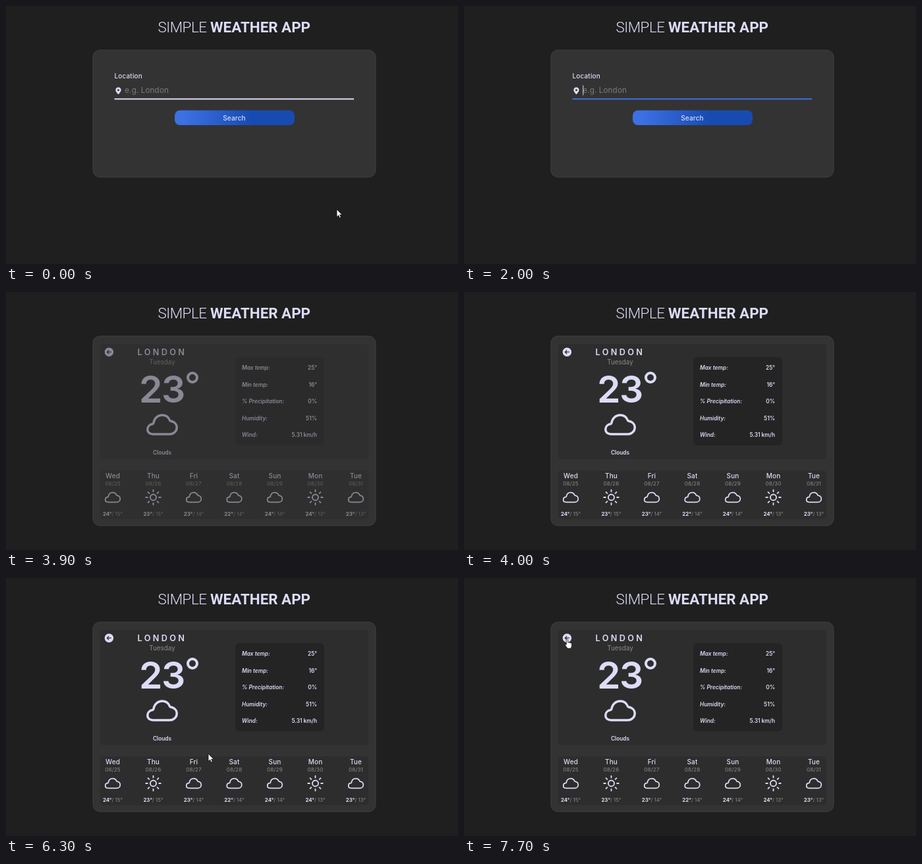
An HTML page that plays this animation: 686 px wide and 392 px high, repeating every 8 s.

```html
<!DOCTYPE html>
<html lang="en">
<head>
<meta charset="utf-8">
<title>Simple Weather App</title>
<style>
html, body { margin: 0; width: 100%; height: 100%; overflow: hidden; background: #1f1f1f; }
svg { display: block; width: 100%; height: 100%; }
text { font-family: Inter, "Open Sans", sans-serif; fill: #dcdcf8; white-space: pre; }
.title { font-family: Roboto, sans-serif; font-size: 22.4px; }
.label { font-size: 10px; font-weight: 500; letter-spacing: .15px; }
.small { font-size: 8.3px; font-weight: 600; }
.date { font-size: 8.2px; letter-spacing: .1px; }
.temp { font-size: 7.9px; }
.mid { text-anchor: middle; }
.end { text-anchor: end; }
.grey { fill: #8b8b8b; }
.icon { fill: none; stroke: #dcdcf8; stroke-linecap: round; stroke-linejoin: round; }
</style>
</head>
<body>
<svg viewBox="0 0 686 392">
  <defs>
    <linearGradient id="blue">
      <stop offset=".08" stop-color="#3c70e3"/>
      <stop offset=".64" stop-color="#184bb2"/>
    </linearGradient>
    <linearGradient id="bright">
      <stop offset=".3" stop-color="#3c70e3"/>
      <stop offset="1" stop-color="#245ac6"/>
    </linearGradient>
    <path id="cloud" stroke-width="37" d="M100 241a16 16 0 0 0 13.5-13C126.600 145.600 186.300 96 256 96c64.700 0 107.800 42.400 125 87a16 16 0 0 0 12.500 10C449.400 202 496 239 496 300c0 62-51 108-112 108H106c-49.500 0-90-24.700-90-79.200 0-48.500 38.700-80.600 84-87.800z"/>
    <g id="sun" stroke-width="34">
      <circle cx="256" cy="256" r="84"/>
      <path d="M256 48v48M256 416v48M403 109l-34 34M143 369l-34 34M464 256h-48M96 256H48M403 403l-34-34M143 143l-34-34"/>
    </g>
  </defs>

  <text class="title" x="230.500" y="40" font-weight="300" letter-spacing="-.5">SIMPLE</text>
  <text class="title" x="310" y="40" font-weight="700">WEATHER APP</text>
  <rect id="card" x="132" y="67" width="429" height="193" rx="10.500" fill="#333" stroke="#404040"/>

  <g id="form">
    <text class="label" x="164.500" y="109.500">Location</text>
    <path fill="#dcdcf8" fill-rule="evenodd" d="M170.500 123.500c-2.500 0-4.200 1.800-4.200 4.100 0 2.800 4.200 7 4.200 7s4.200-4.200 4.200-7c0-2.300-1.700-4.100-4.200-4.100zm0 2.700a1.500 1.500 0 1 1 0 3 1.500 1.500 0 0 1 0-3z"/>
    <text id="hint" class="grey" x="180.300" y="132.300" font-size="11.700" letter-spacing=".1" style="fill:#7b7b7b">e.g. London</text>
    <text id="typed" x="180.500" y="132.300" font-size="11.700" font-weight="500" letter-spacing=".3"></text>
    <rect id="caret" y="120.500" width="1" height="15" fill="#dcdcf8"/>
    <rect id="line" x="164.500" y="140.300" width="363.500" height="2"/>
    <rect id="button" x="256" y="158.500" width="182" height="22.500" rx="8"/>
    <text class="label mid" x="346.500" y="173.500">Search</text>
  </g>

  <g id="result">
    <rect x="143" y="79" width="407" height="175" rx="5" fill="#2d2d2d"/>
    <circle cx="156.400" cy="91.200" r="6.700" fill="#dcdcf8"/>
    <path d="M159.800 91.200h-6.300m2.700-2.800l-2.800 2.800 2.800 2.800" fill="none" stroke="#2d2d2d" stroke-width="1.300"/>
    <text x="199.500" y="96" font-size="12.700" font-weight="600" letter-spacing="3.350">LONDON</text>
    <text class="mid grey" x="237" y="109.500" font-size="9.900">Tuesday</text>
    <text x="202" y="167.500" font-size="57" font-weight="600" letter-spacing="-1.500">23</text>
    <circle cx="283" cy="130" r="7" fill="none" stroke="#dcdcf8" stroke-width="4"/>
    <text class="small mid" x="237" y="247.300">Clouds</text>
    <rect x="348" y="99" width="135" height="134" rx="6" fill="#242424"/>
    <rect x="143" y="271" width="407" height="74" rx="5" fill="#2d2d2d"/>
  </g>

  <g id="pointer" stroke-linejoin="round">
    <path id="arrow" fill="#fff" stroke="#111" stroke-width=".8" d="M0 0v11.500l2.600-2.400 1.800 4 2-.9-1.800-3.900h3.500z"/>
    <path id="hand" fill="#fff" stroke="#111" stroke-width=".8" d="M-1.200 1Q0-.8 1.200 1v4.500q1.200-1 2 .3 1.200-.8 2 .5 1.800-.6 1.900 1.200v3.200L5.800 14.500H.6L-3 9.500q-.4-2 1.800-.8z"/>
    <path id="beam" fill="none" stroke="#111" d="M-2-5.500q2 0 2 1.500v8q0 1.500-2 1.500M2-5.500q-2 0-2 1.500v8q0 1.500 2 1.500"/>
  </g>
</svg>
<script>
const $ = id => document.getElementById(id);
const show = (id, on) => $(id).style.display = on ? '' : 'none';
const add = markup => $('result').insertAdjacentHTML('beforeend', markup);
const text = (cls, x, y, s) => add(`<text class="${cls}" x="${x}" y="${y}">${s}</text>`);
const icon = (name, x, y, k, cy) => add(
  `<use href="#${name}" class="icon" transform="translate(${x} ${y}) scale(${k}) translate(-256 ${-cy})"/>`);

icon('cloud', 237, 201.5, .0925, 252);

[['Max temp:', '25°'], ['Min temp:', '16°'], ['% Precipitation:', '0%'],
 ['Humidity:', '51%'], ['Wind:', '5.31 km/h']].forEach(([name, value], i) => {
  const y = 118.3 + i * 25.5;
  add(`<text class="small" font-style="italic" x="358" y="${y}">${name}</text>`);
  text('small end', 472, y, value);
});

[['Wed', 24, 15], ['Thu', 23, 15], ['Fri', 23, 14], ['Sat', 22, 14],
 ['Sun', 24, 14], ['Mon', 24, 13], ['Tue', 23, 13]].forEach(([day, max, min], i) => {
  const x = 162 + i * 61.5;
  text('label mid', x, 283, day);
  text('date mid grey', x, 293.5, '08/' + (25 + i));
  if (i == 1 || i == 5) icon('sun', x, 312, .054, 256);
  else icon('cloud', x, 312, .047, 252);
  text('temp mid', x, 339.7, `<tspan font-weight="700">${max}°</tspan><tspan class="grey">/ ${min}°</tspan>`);
});

// Pointer stops: time, x, y
const paths = [
  [[0, 502, 309], [100, 499, 304], [500, 440, 230], [800, 390, 150], [900, 384, 132],
   [1100, 384, 132], [1600, 646, 266]],
  [[5700, 639, 278], [6000, 450, 274], [6300, 307, 267], [6500, 265, 257], [6700, 180, 238],
   [6900, 152, 195], [7100, 131, 105], [7400, 154, 93], [7500, 156.5, 92.5], [8000, 156.5, 92.5]]
];

function pointerAt(t) {
  const path = paths.find(p => t >= p[0][0] && t <= p[p.length - 1][0]);
  if (!path) return null;
  const i = Math.max(1, path.findIndex(p => p[0] >= t));
  const [t0, x0, y0] = path[i - 1], [t1, x1, y1] = path[i];
  const k = (t - t0) / (t1 - t0);
  return [x0 + (x1 - x0) * k, y0 + (y1 - y0) * k];
}

const within = (p, x0, y0, x1, y1) => !!p && p[0] > x0 && p[0] < x1 && p[1] > y0 && p[1] < y1;

function draw(t) {
  const done = t >= 3900;
  show('form', !done);
  show('result', done);
  $('result').setAttribute('opacity', t < 4000 ? .5 : 1);
  $('card').setAttribute('height', done ? 288 : 193);

  const count = t < 2700 ? 0 : t < 2900 ? 1 : Math.min(6, Math.floor(t / 100) - 27);
  $('typed').textContent = 'london'.slice(0, count);
  show('hint', !count);
  const focus = t >= 1000 && t < 3600;
  show('caret', focus && (count || t % 1000 < 500));
  $('caret').setAttribute('x', count ? 180.7 + $('typed').getComputedTextLength() : 180.3);
  $('line').setAttribute('fill', focus ? '#3c70e3' : '#dcdcf8');

  const p = pointerAt(t);
  const onButton = !done && within(p, 256, 158, 438, 181);
  const onInput = !done && within(p, 180, 120, 528, 142);
  const onBack = done && within(p, 149, 84, 164, 98);
  $('button').setAttribute('fill', onButton ? 'url(#bright)' : 'url(#blue)');
  show('pointer', p);
  if (p) $('pointer').setAttribute('transform', `translate(${p})`);
  show('hand', onButton || onBack);
  show('beam', onInput);
  show('arrow', !onButton && !onBack && !onInput);
}

const start = performance.now();
function tick() {
  const t = (performance.now() - start) % 8000;
  draw(Math.floor(t / 100) * 100);
  requestAnimationFrame(tick);
}
tick();
</script>
</body>
</html>
```
